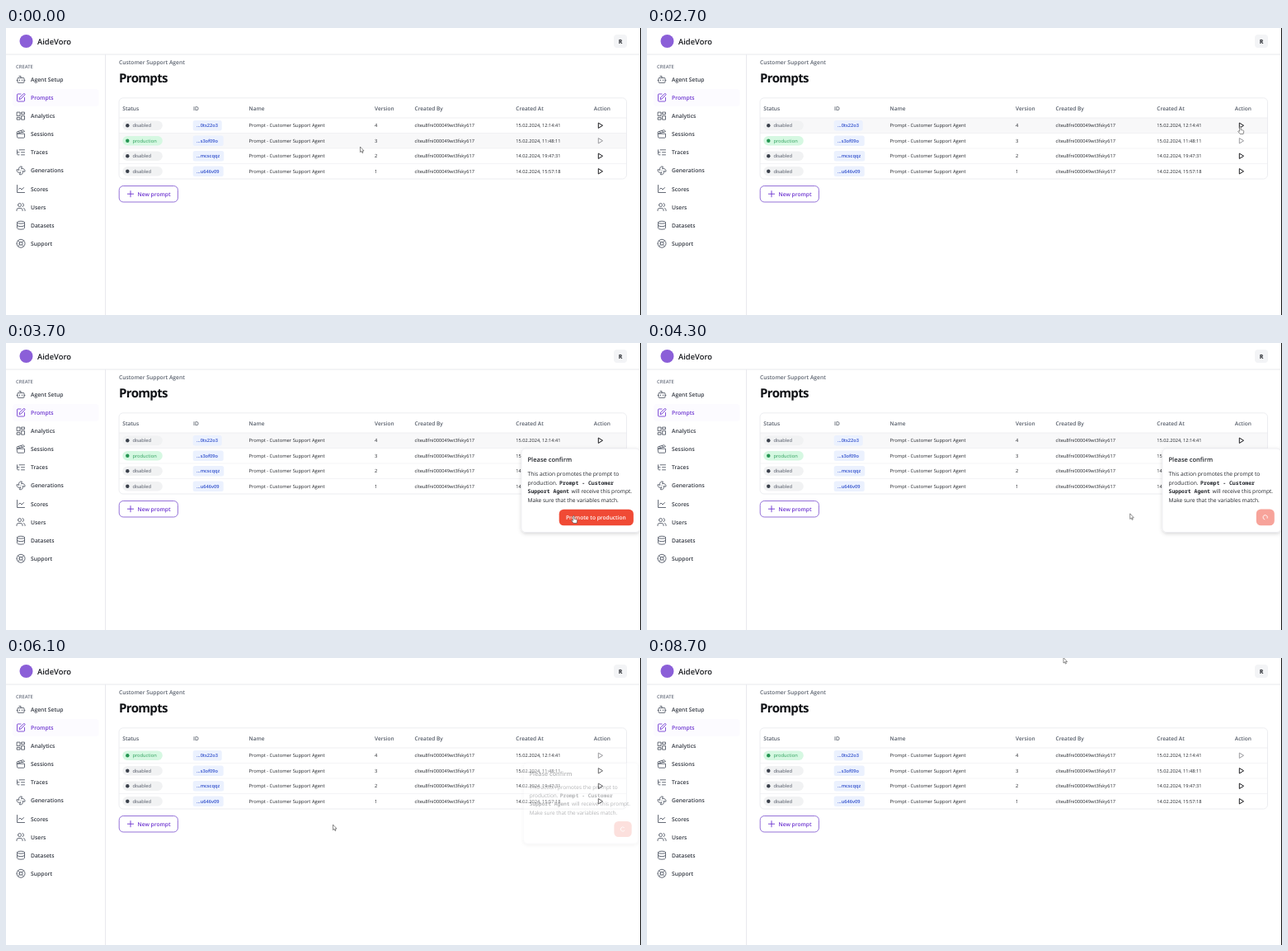
These frames come from a looping animation (770x348 px, 9 s). An HTML page:

```html
<!DOCTYPE html>
<html lang="en">
<head>
<meta charset="utf-8">
<title>Prompts</title>
<style>
html, body { margin: 0; width: 100%; height: 100%; overflow: hidden; background: #fff; }
svg { display: block; width: 100vw; height: 100vh; }
text { font-family: "Open Sans", "Noto Sans", sans-serif; text-rendering: geometricPrecision; white-space: pre; }
.mono { font-family: "Noto Sans Mono", "DejaVu Sans Mono", monospace; }
.icon { fill: none; stroke-width: 1.7; stroke-linecap: round; stroke-linejoin: round; }
</style>
</head>
<body>
<svg id="stage" viewBox="0 0 770 348"></svg>
<script>
const LOOP = 9000, OPEN = 3000, CLICK = 3800, DONE = 6000;
const ROW_TOP = 109, ROW_H = 18.5;
const INK = '#22252b', GREY = '#4b5260', PURPLE = '#6d35d0', LINE = '#e8e9ed';

const text = (x, y, size, str, fill = INK, weight = 400, extra = '') =>
  `<text x="${x}" y="${y}" font-size="${size}" font-weight="${weight}" fill="${fill}" ${extra}>${str}</text>`;
const box = (x, y, w, h, r, fill, extra = '') =>
  `<rect x="${x}" y="${y}" width="${w}" height="${h}" rx="${r}" fill="${fill}" ${extra}/>`;
const ring = (x, y, r) => `M${x - r} ${y}a${r} ${r} 0 1 0 ${2 * r} 0a${r} ${r} 0 1 0 ${-2 * r} 0`;

// Sidebar icons on a 24 unit grid
const menu = [
  ['Agent Setup', 'M12 8V4H8M6 8h12a2 2 0 0 1 2 2v8a2 2 0 0 1-2 2H6a2 2 0 0 1-2-2v-8a2 2 0 0 1 2-2M2 14h2M20 14h2M15 13v2M9 13v2'],
  ['Prompts', 'M12 3H5a2 2 0 0 0-2 2v14a2 2 0 0 0 2 2h14a2 2 0 0 0 2-2v-7M18.4 2.6a2.1 2.1 0 0 1 3 3L12 15l-4 1 1-4z'],
  ['Analytics', 'M3 3h7v9H3zM14 3h7v5h-7zM14 12h7v9h-7zM3 16h7v5H3z'],
  ['Sessions', 'M20.2 6 3 11l-.9-2.4c-.3-1.1.3-2.2 1.3-2.5l13.5-4c1.1-.3 2.2.3 2.5 1.3zM6.2 5.3l3.1 3.9M12.4 3.4l3.1 4M3 11h18v8a2 2 0 0 1-2 2H5a2 2 0 0 1-2-2z'],
  ['Traces', 'M21 12h-8M21 6H8M21 18h-8M3 6v4c0 1.1.9 2 2 2h3M3 10v6c0 1.1.9 2 2 2h3'],
  ['Generations', 'M10.8 16.4a6.1 6.1 0 0 1-8.6-7l5.4 1.4a6.1 6.1 0 0 1 7-8.6l-1.4 5.4a6.1 6.1 0 0 1 8.6 7l-5.4-1.4a6.1 6.1 0 0 1-7 8.6zM12 12v.01'],
  ['Scores', 'M3 3v18h18M19 9l-5 5-4-4-3 3'],
  ['Users', 'M16 21v-2a4 4 0 0 0-4-4H6a4 4 0 0 0-4 4v2M22 21v-2a4 4 0 0 0-3-3.9M16 3.1a4 4 0 0 1 0 7.8' + ring(9, 7, 4)],
  ['Datasets', 'M3 5a9 3 0 0 0 18 0a9 3 0 0 0-18 0V19A9 3 0 0 0 21 19V5M3 12A9 3 0 0 0 21 12'],
  ['Support', 'M4.9 4.9l4.3 4.3M14.8 9.2l4.3-4.3M14.8 14.8l4.3 4.3M9.2 14.8l-4.3 4.3' + ring(12, 12, 10) + ring(12, 12, 4)]
];

const menuItem = ([label, path], i) => {
  const y = 62.4 + i * 22.1, active = label === 'Prompts';
  return (active ? box(8, y - 10.5, 104.5, 21, 4, '#fcfbff') : '') +
    `<path class="icon" d="${path}" stroke="${active ? PURPLE : GREY}" transform="translate(12 ${y - 6}) scale(.5)"/>` +
    text(30, y + 2.5, 6.75, label, active ? PURPLE : '#343943', 600);
};

const prompts = [
  ['...0ts22o3', '15.02.2024, 12:14:41', 35],
  ['...s3of09o', '15.02.2024, 11:48:11', 37],
  ['...mcscqqz', '14.02.2024, 19:47:31', 37.5],
  ['...u646v09', '14.02.2024, 15:57:18', 37]
];
const heads = [[141.3, 'Status'], [227, 'ID'], [294.5, 'Name'], [447, 'Version'],
  [495.5, 'Created By'], [618.3, 'Created At'], [712.8, 'Action']];
const midY = i => ROW_TOP + (i + .5) * ROW_H;

const tableRow = ([id, date, width], i) => {
  const y = midY(i), base = y + 2;
  return (i ? `<path d="M137 ${ROW_TOP + i * ROW_H}H752.5" stroke="#ededf0" stroke-width=".6"/>` : '') +
    box(226.7, y - 6.3, width, 12.6, 2.5, '#ebf1fe') +
    text(231, base, 5.65, id, '#3150cc', 600) +
    text(294.5, base, 5.8, 'Prompt - Customer Support Agent') +
    text(447, base, 5.75, 4 - i) +
    text(495.5, base, 5.7, 'clteu8fni000049wt3fsky617') +
    text(618.3, base, 5.67, date);
};

// Status pills and play buttons, with one row live
const statuses = live => prompts.map((_, i) => {
  const y = midY(i), on = i === live;
  return box(141.3, y - 5.8, 48.5, 11.6, 5.8, on ? '#d6f8e2' : '#f1f2f3') +
    `<circle cx="147.3" cy="${y}" r="2.2" fill="${on ? '#269653' : '#3a404b'}"/>` +
    text(153.4, y + 2, 5.72, on ? 'production' : 'disabled', on ? '#2c9f5b' : GREY) +
    `<path d="M718.3 ${y - 3.2}v6.4l5.2-3.2z" fill="none" stroke="${on ? '#9a9a9e' : '#1b1b1f'}" stroke-linejoin="round"/>`;
}).join('');

const popup = box(625, 128, 144, 101.5, 5, '#fff', `stroke="${LINE}" stroke-width=".7" filter="url(#shadow)"`) +
  text(632.5, 144.2, 7.5, 'Please confirm', INK, 600) +
  text(632.5, 161.4, 6.7, 'This action promotes the prompt to') +
  text(632.5, 171.8, 6.7, 'production.') +
  text(671, 171.8, 6.47, 'Prompt - Customer', INK, 700, 'class="mono"') +
  text(632.5, 182.3, 6.47, 'Support Agent', INK, 700, 'class="mono"') +
  text(685.5, 182.3, 6.65, 'will receive this prompt.') +
  text(632.5, 192.8, 6.63, 'Make sure that the variables match.') +
  `<g id="ready">${box(670.7, 201.7, 90.2, 19.6, 5.5, '#f04a35')}${text(679, 214, 6.62, 'Promote to production', '#fff', 600)}</g>` +
  `<g id="busy">${box(738.8, 201.5, 22, 19.8, 5.5, '#f7a39a')}
    <path id="spinner" d="M0-2.7A2.7 2.7 0 1 0 2.7 0" fill="none" stroke="#fff" stroke-width=".8" stroke-linecap="round"/></g>`;

stage.innerHTML = `
  <defs><filter id="shadow" x="-10%" y="-10%" width="120%" height="125%">
    <feDropShadow dx="0" dy="1.5" stdDeviation="2" flood-color="#000" flood-opacity=".16"/></filter></defs>
  <path d="M0 32H770M120.5 32V348" stroke="${LINE}"/>
  <circle cx="24.5" cy="16" r="8" fill="#8b5fd8"/>
  ${text(38, 20, 9.4, 'AideVoro', '#16181d', 600)}
  ${box(737, 8, 16, 16, 4, '#f3f4f6')}
  ${text(745, 18.6, 7, 'R', INK, 700, 'text-anchor="middle"')}
  ${text(12, 48.5, 5.9, 'CREATE', '#6b7280', 600)}
  ${menu.map(menuItem).join('')}
  ${text(137, 44.2, 6.7, 'Customer Support Agent', '#5d6470', 600)}
  ${text(137, 66, 15, 'Prompts', '#101216', 700, 'letter-spacing="-.65"')}
  ${box(137, ROW_TOP, 615.5, ROW_H, 0, '#f8f8f9', 'id="hover"')}
  ${box(137, 84.8, 615.5, 98.2, 5, 'none', `stroke="${LINE}" stroke-width=".8"`)}
  <path d="M137 ${ROW_TOP}H752.5" stroke="${LINE}" stroke-width=".7"/>
  ${heads.map(([x, s]) => text(x, 99.5, 6.55, s, '#565d69', 600)).join('')}
  ${prompts.map(tableRow).join('')}
  <g id="before">${statuses(1)}</g>
  <g id="after">${statuses(0)}</g>
  ${box(137.2, 191.5, 71.2, 19.5, 5, '#fff', 'stroke="#8a62d4" stroke-width=".9"')}
  <path d="M147 201.2h8M151 197.2v8" stroke="${PURPLE}" stroke-width=".9"/>
  ${text(159.5, 203.8, 6.65, 'New prompt', PURPLE, 600)}
  <g id="popup">${popup}</g>
  ${box(769, 0, 1, 348, 0, '#151515')}
  <g id="cursor" fill="#fff" stroke="#444" stroke-width=".6" stroke-linejoin="round">
    <path id="arrow" d="M0 0V6.6L1.5 5.3 2.5 7.6 3.5 7.1 2.5 5H4.6Z"/>
    <path id="hand" d="M-.9.6a.8.8 0 0 1 1.6 0V4l2.6.6q1 .3.9 1.4L3.6 9H-.4L-2.8 5.8q.5-.9 1.9 0Z"/>
  </g>`;

const $ = id => document.getElementById(id);
const show = (id, on) => $(id).setAttribute('visibility', on ? 'inherit' : 'hidden');
const clamp = v => Math.min(1, Math.max(0, v));

// Pointer stops: time, x, y
const stops = [[0, 429.5, 144], [600, 429.5, 144], [1600, 693.5, 124], [2000, 719.5, 119.5],
  [3100, 719.5, 119.5], [3500, 688.5, 209.5], [3900, 688.5, 209.5], [4900, 396.5, 202],
  [6600, 396.5, 202], [6800, 401, 194], [6900, 401, 194], [7400, 516, 5], [7600, 505, -.5], [LOOP, 505, -.5]];

function pointer(t) {
  const i = stops.findIndex(s => s[0] > t);
  const [t0, x0, y0] = stops[i - 1], [t1, x1, y1] = stops[i];
  const p = (t - t0) / (t1 - t0), e = p * p * (3 - 2 * p);
  return [x0 + (x1 - x0) * e, y0 + (y1 - y0) * e];
}

function draw(now) {
  const t = Math.floor(now % LOOP / 100) * 100;
  const [x, y] = pointer(t);
  $('cursor').setAttribute('transform', `translate(${x} ${y})`);
  const hand = t >= 1900 && t < CLICK;
  show('hand', hand);
  show('arrow', !hand);

  const row = t >= OPEN && t < DONE ? 0 : Math.floor((y - ROW_TOP) / ROW_H);
  show('hover', row >= 0 && row < 4);
  $('hover').setAttribute('y', ROW_TOP + row * ROW_H);
  show('before', t < DONE);
  show('after', t >= DONE);

  const p = t < DONE ? clamp((t - OPEN - 45) / 150) : clamp((DONE + 200 - t) / 300);
  const scale = .95 + .05 * p;
  show('popup', p > 0);
  $('popup').setAttribute('opacity', p);
  $('popup').setAttribute('transform',
    `translate(697 ${128 - 1.6 * (1 - p)}) scale(${scale}) translate(-697 -128)`);
  show('ready', t < CLICK);
  show('busy', t >= CLICK);
  $('spinner').setAttribute('transform', `translate(749.7 211.4) rotate(${t * .36 % 360})`);
  requestAnimationFrame(draw);
}
requestAnimationFrame(draw);
</script>
</body>
</html>
```
